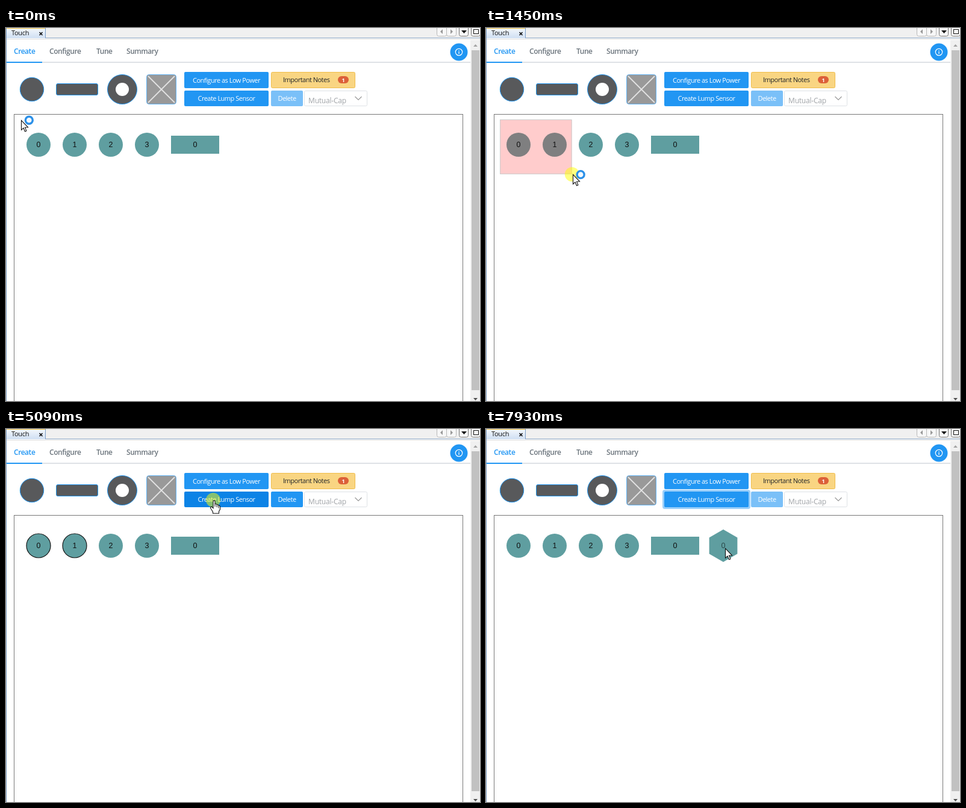
Recreate the animation shown at these times as an HTML page with a canvas. Size 787 by 620 pixels, loop 8000 ms.

```html
<!DOCTYPE html>
<html lang="en">
<head>
<meta charset="utf-8">
<title>Touch sensor editor</title>
<style>
  html, body { margin: 0; width: 100%; height: 100%; overflow: hidden; background: #fff; }
  canvas { display: block; }
</style>
</head>
<body>
<canvas id="stage" width="787" height="620"></canvas>
<script>
const ctx = document.getElementById('stage').getContext('2d');
const LOOP = 8000;
const SANS = '"Open Sans", "Noto Sans", sans-serif';
const ARIAL = '"Liberation Sans", Arial, sans-serif';
const BLUE = '#2196f3', TEAL = '#5f9ea0', DARK = '#58595b';

// Pointer path: time, x, y
const PATH = [
  [0, 25, 153], [90, 25, 153], [820, 107, 230], [970, 122, 238], [1660, 147, 244],
  [2780, 147, 244], [3570, 190, 146], [3850, 272, 143], [4130, 324, 128],
  [4410, 344, 118], [4540, 344, 118], [4670, 345, 118], [6690, 345, 118],
  [6880, 364, 127], [7090, 420, 152], [7300, 462, 190], [7510, 448, 218],
  [7640, 431, 231], [7930, 397, 198], [8000, 397, 198]
];
const DRAG = [70, 1730], CLICK = [5085, 5200], CREATED = 5630;
const ENTER = 4060, LEAVE = 6890;

const clamp = v => Math.max(0, Math.min(1, v));
const ramp = (t, start, length) => clamp((t - start) / length);
const within = (t, [from, to]) => t >= from && t < to;

// Monotone slope, so resting points never overshoot
function slope(i, axis) {
  const a = PATH[i - 1], b = PATH[i], c = PATH[i + 1];
  if (!a || !c) return 0;
  const left = (b[axis] - a[axis]) / (b[0] - a[0]);
  const right = (c[axis] - b[axis]) / (c[0] - b[0]);
  return left * right <= 0 ? 0 : 2 * left * right / (left + right);
}

function pointer(t) {
  let i = 0;
  while (i < PATH.length - 2 && PATH[i + 1][0] <= t) i++;
  const a = PATH[i], b = PATH[i + 1], span = b[0] - a[0];
  const u = clamp((t - a[0]) / span), v = 1 - u;
  return [1, 2].map(k =>
    v * v * (1 + 2 * u) * a[k] + u * u * (3 - 2 * u) * b[k] +
    span * u * v * (v * slope(i, k) - u * slope(i + 1, k)));
}

function paint(fill, stroke, width = 1) {
  if (fill) { ctx.fillStyle = fill; ctx.fill(); }
  if (stroke) { ctx.strokeStyle = stroke; ctx.lineWidth = width; ctx.stroke(); }
}
function rect(x, y, w, h, fill) {
  ctx.fillStyle = fill;
  ctx.fillRect(x, y, w, h);
}
function round(x, y, w, h, r, fill, stroke, width) {
  ctx.beginPath();
  ctx.roundRect(x, y, w, h, r);
  paint(fill, stroke, width);
}
function circle(x, y, r, fill, stroke, width) {
  ctx.beginPath();
  ctx.arc(x, y, r, 0, Math.PI * 2);
  paint(fill, stroke, width);
}
function poly(points, fill, stroke, width) {
  ctx.beginPath();
  points.forEach(([x, y]) => ctx.lineTo(x, y));
  if (fill) ctx.closePath();
  paint(fill, stroke, width);
}
function text(s, x, y, font, color, spacing = 0, align = 'left') {
  ctx.font = font;
  ctx.fillStyle = color;
  ctx.textAlign = align;
  ctx.letterSpacing = spacing + 'px';
  ctx.fillText(s, x, y);
}
function mix(a, b, k) {
  return `rgb(${a.map((v, i) => Math.round(v + (b[i] - v) * k)).join()})`;
}

function windowFrame() {
  rect(0, 0, 787, 620, '#fff');
  rect(0, 0, 787, 17, '#f0f0f0');
  rect(66, 16, 721, 1, '#8ea9c8');
  const tab = ctx.createLinearGradient(0, 0, 0, 17);
  tab.addColorStop(0, '#f4f8fd');
  tab.addColorStop(1, '#cfdff2');
  rect(0, 0, 65, 17, tab);
  rect(0, 0, 65, 1, '#f5c542');
  rect(65, 0, 1, 17, '#7a9cc6');
  rect(0, 0, 1, 620, '#7a9cc6');
  rect(1, 18, 786, 1, '#dcdcdc');
  text('Touch', 9, 12, '11px ' + SANS, '#111', -0.3);
  poly([[55.5, 7], [60.5, 12]], null, '#111', 1.6);
  poly([[60.5, 7], [55.5, 12]], null, '#111', 1.6);

  for (const x of [715.5, 731.5]) round(x, -4, 16, 17.5, 3, '#f7f7f7', '#b8b8b8');
  for (const x of [752.5, 772.5]) round(x, -4, 15, 17.5, 3, '#f7f7f7', '#777');
  poly([[725, 2], [725, 10], [721, 6]], '#999');
  poly([[738, 2], [738, 10], [742, 6]], '#999');
  poly([[756, 4], [765, 4], [760.5, 9]], '#111');
  ctx.strokeStyle = '#111';
  ctx.strokeRect(776.5, 2.5, 8, 7);

  rect(771, 20, 16, 600, '#f0f0f0');
  rect(773, 37, 13, 565, '#c1c1c1');
  poly([[776, 31], [783, 31], [779.5, 27]], '#a3a3a3');
  poly([[776, 615], [783, 615], [779.5, 619]], '#505050');
}

function header() {
  rect(1, 56, 770, 2, '#dee2e6');
  rect(1, 56, 59, 2, BLUE);
  const tabs = { Create: 13, Configure: 72, Tune: 150, Summary: 200 };
  for (const name in tabs)
    text(name, tabs[name], 43, '600 12px ' + SANS, name === 'Create' ? BLUE : '#6c757d', -0.45);
  circle(752, 40, 14.5, BLUE);
  circle(752, 40, 5.7, null, '#fff', 1.2);
  rect(751.4, 37, 1.2, 1.2, '#fff');
  rect(751.4, 39, 1.2, 4, '#fff');
}

function palette() {
  circle(43, 102, 19.7, DARK, BLUE);
  round(83.5, 92.5, 69, 19, 2.5, DARK, BLUE);
  circle(193, 102, 24.5, DARK, BLUE);
  circle(193, 102, 11, '#fff');
  round(233.5, 77.5, 49, 49, 4, '#999', '#64b5f6');
  poly([[236, 80], [280, 124]], null, '#e2e2e2', 1.8);
  poly([[280, 80], [236, 124]], null, '#e2e2e2', 1.8);
}

function button(label, x, y, w, h, fill, color = '#fff') {
  round(x, y, w, h, 2, fill);
  text(label, x + w / 2, y + h / 2 + 4, '11px ' + SANS, color, -0.5, 'center');
}

function toolbar(t) {
  button('Configure as Low Power', 296, 73, 140, 27, BLUE);

  const focus = ramp(t, 5150, 150) - ramp(t, CREATED, 150) + ramp(t, 6130, 150);
  if (focus > 0) round(293, 101, 146, 32, 4, `rgba(33,150,243,${0.45 * focus})`);
  const hover = ramp(t, ENTER, 150) - ramp(t, LEAVE, 150);
  button('Create Lump Sensor', 296, 104, 140, 26, mix([33, 150, 243], [12, 131, 230], hover));

  round(440.5, 73.5, 139, 26, 2, '#f9d582', '#efbd4b');
  text('Important Notes', 460, 90, '11px ' + SANS, '#212529', -0.5);
  round(551, 80, 18, 12, 6, '#dc6039');
  text('1', 560, 89.5, 'bold 9px ' + SANS, '#fff', 0, 'center');

  const enabled = ramp(t, 1760, 200) - ramp(t, CREATED, 200);
  button('Delete', 440, 104, 53, 26, mix([122, 192, 248], [33, 150, 243], enabled));

  round(495.5, 104.5, 104, 25, 2, '#fff', '#dee2e6');
  text('Mutual-Cap', 502, 125, '12px ' + SANS, '#a0a4a8', -0.2);
  poly([[579.5, 114], [585, 119.5], [590.5, 114]], null, '#999', 1.2);
}

function digit(s, x, color = '#111') {
  text(s, x, 198, '12.5px ' + ARIAL, color, 0, 'center');
}

function board(t, x, y) {
  ctx.strokeStyle = '#777';
  ctx.lineWidth = 1;
  ctx.strokeRect(13.5, 143.5, 745, 500);
  for (let i = 0; i < 4; i++) {
    circle(54 + 60 * i, 194, 20, TEAL);
    if (i < 2 && within(t, [DRAG[1], CREATED])) circle(54 + 60 * i, 194, 20, null, '#111', 1.2);
  }
  rect(274, 179, 80, 30, TEAL);
  if (t >= CREATED) {
    const corners = [0, 1, 2, 3, 4, 5].map(i => {
      const a = Math.PI * (i / 3 - 0.5);
      return [394 + 27 * Math.cos(a), 194 + 27 * Math.sin(a)];
    });
    poly(corners, TEAL);
    digit('0', 394, '#2b4a4b');
  }
  if (within(t, DRAG)) {
    const [right, bottom] = pointer(Math.max(0, t - 40));
    if (right > 26) {
      rect(24, 153, right - 24, bottom - 153, 'rgba(255,0,0,0.2)');
      ctx.strokeStyle = '#ccc';
      ctx.strokeRect(23.5, 152.5, right - 24, bottom - 153);
    }
  }
  ['0', '1', '2', '3'].forEach((s, i) => digit(s, 54 + 60 * i));
  digit('0', 314);
}

const ARROW = [[0, 0], [0, 16], [3.5, 12.7], [6, 18.5], [8.4, 17.4], [6, 11.7], [11, 11.5]];
const HAND = [
  [-1.5, 1.2], [0, 0.2], [1.5, 1.2], [1.5, 6], [4, 6.2], [4.8, 7.2], [7, 7.4], [7.8, 8.6],
  [9.6, 9.4], [10, 11], [10, 15], [8, 18.5], [8, 21.8], [-2, 21.8], [-2, 19.5],
  [-4, 16], [-6, 13], [-5.6, 11], [-4, 10.6], [-1.5, 13.2]
];

function cursor(t, x, y) {
  if (within(t, DRAG) || within(t, CLICK)) circle(x - 1, y, 12, 'rgba(255,255,0,0.5)');
  if (t < DRAG[1]) circle(x + 13.3, y + 0.3, 6, '#f3f9fe', '#2b90e8', 3.4);
  const hand = within(t, [ENTER, LEAVE]);
  ctx.save();
  ctx.translate(Math.round(x) + 0.5, Math.round(y) + 0.5);
  poly(hand ? HAND : ARROW, '#fff', '#111', 1.1);
  if (hand) {
    for (const [px, top] of [[1.5, 6], [4.6, 7], [7.4, 8.5]])
      poly([[px, top], [px, top + 4.5]], null, '#111', 1);
  }
  ctx.restore();
}

function draw(now) {
  const t = now % LOOP;
  const [x, y] = pointer(t);
  windowFrame();
  header();
  palette();
  toolbar(t);
  board(t);
  cursor(t, x, y);
}

let begin;
function tick(now) {
  begin ??= now;
  draw(now - begin);
  requestAnimationFrame(tick);
}
draw(0);
requestAnimationFrame(tick);
</script>
</body>
</html>
```
